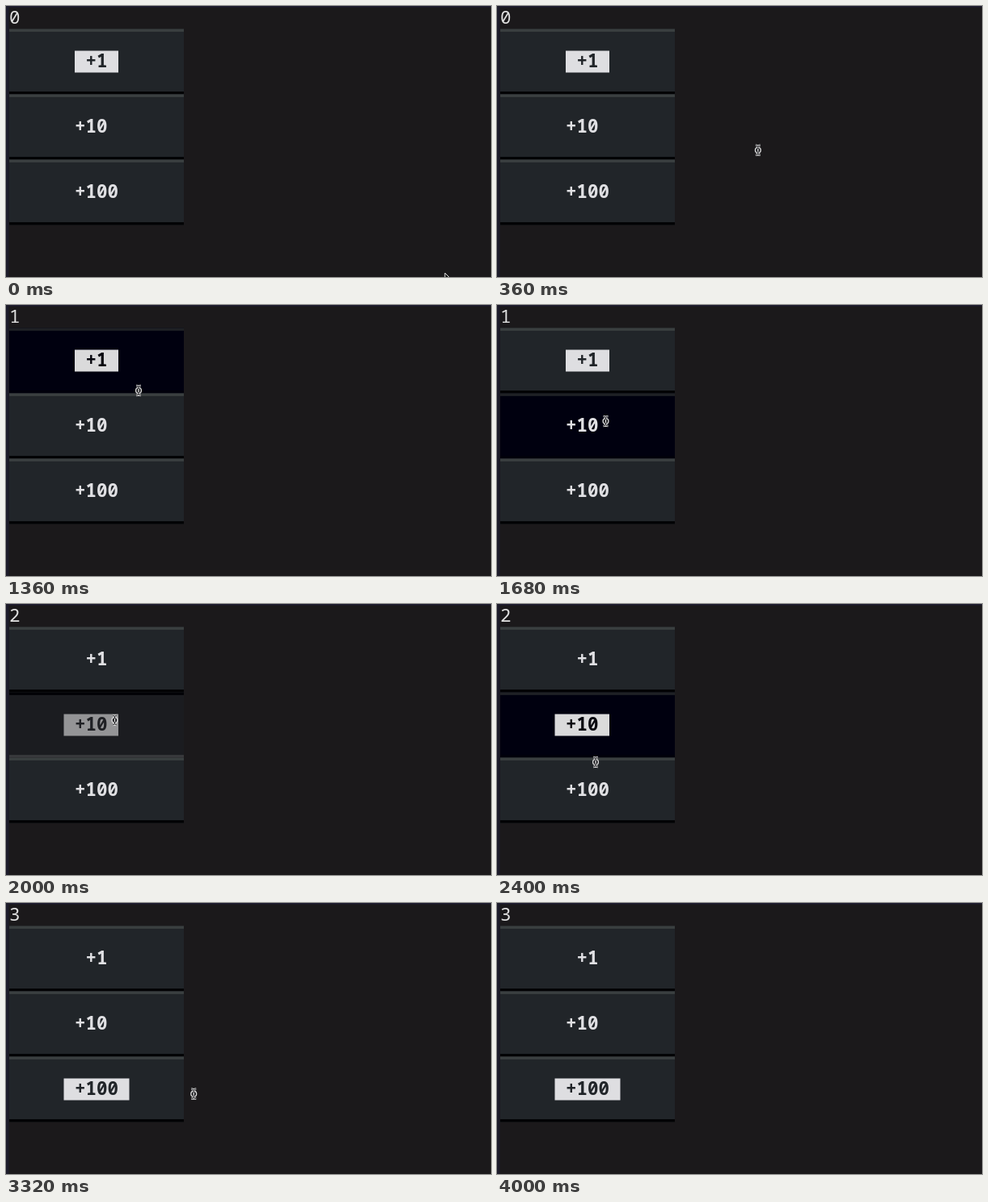
An HTML page for the animation above (4.32 s loop, 600x336 px).

```html
<!DOCTYPE html>
<html lang="en">
<head>
<meta charset="utf-8">
<title>Counter buttons</title>
<style>
html, body { margin: 0; width: 100%; height: 100%; overflow: hidden; background: #1b191b; }
svg { display: block; width: 600px; height: 336px; }
text { font: 22.5px "Noto Sans Mono", monospace; white-space: pre; }
.label { font-weight: 700; }
</style>
</head>
<body>
<svg id="stage" viewBox="0 0 600 336">
  <rect width="600" height="336" fill="#1b191b"/>
  <rect width="600" height="1.5" fill="#1f1d31"/>
  <rect width="3.5" height="336" fill="#1d1c2b"/>
  <text id="count" x="4" y="22" fill="#e0e0e0">0</text>
  <g id="buttons"></g>
  <g id="arrow">
    <path d="M0 0V15L3.6 11.6L6 17L8.4 16L6 10.6H10.5Z" fill="#111" stroke="#e8e8e8" stroke-width="1"/>
  </g>
  <g id="beam" fill="none">
    <path id="beamBack" d="M-3 -6Q0 -6 0 -4V4Q0 6 3 6M3 -6Q0 -6 0 -4M0 4Q0 6 -3 6" stroke="#d8d8d8" stroke-width="2.6"/>
    <circle r="3.4" fill="#16161a" stroke="#d8d8d8" stroke-width="1.4"/>
    <path d="M-3 -6Q0 -6 0 -4V4Q0 6 3 6M3 -6Q0 -6 0 -4M0 4Q0 6 -3 6" stroke="#16161a" stroke-width="0.9"/>
    <path d="M0 -2V2" stroke="#d8d8d8" stroke-width="1.4"/>
  </g>
</svg>
<script>
const NS = "http://www.w3.org/2000/svg";
const LOOP = 4320, STEP = 40, CELL = 13.5, ROW = 27, LEFT = 4, WIDTH = 216;
const byId = id => document.getElementById(id);

function add(parent, tag, attrs) {
  const node = document.createElementNS(NS, tag);
  set(node, attrs);
  parent.appendChild(node);
  return node;
}
function set(node, attrs) {
  for (const key in attrs) node.setAttribute(key, attrs[key]);
}

// fill, top edge, bottom edge, focused label box, focused label text
const looks = {
  idle:   ["#212529", "#3a3f40", "#020204", "#dedee1", "#212529"],
  hover:  ["#00000f", "#1f2125", "#00000b", "#dadadb", "#08080f"],
  active: ["#1b1c20", "#020206", "#38393c", "#949496", "#1f2024"]
};

const buttons = [["+1", 7], ["+10", 6], ["+100", 6]].map(([label, col], i) => {
  const y = 28.5 + i * ROW * 3, x = LEFT + col * CELL;
  const bar = (top, h) => add(byId("buttons"), "rect", { x: LEFT, y: top, width: WIDTH, height: h });
  const body = bar(y, ROW * 3), top = bar(y, 3.4), bottom = bar(y + ROW * 3 - 3.4, 3.4);
  const box = add(byId("buttons"), "rect",
    { x: x - CELL, y: y + ROW, width: (label.length + 2) * CELL, height: ROW });
  const text = add(byId("buttons"), "text", { x, y: y + ROW + 20.5, class: "label" });
  text.textContent = label;
  return { body, top, bottom, box, text };
});

function paint(button, look, focused) {
  const [fill, top, bottom, box, ink] = looks[look];
  set(button.body, { fill });
  set(button.top, { fill: top });
  set(button.bottom, { fill: bottom });
  set(button.box, { fill: focused ? box : "none" });
  set(button.text, { fill: focused ? ink : "#e0e0e3" });
}

// pointer keys: time, x, y
const path = [
  [40, 543, 331], [600, 180, 80], [1000, 180, 80], [1360, 164, 106],
  [1520, 138, 141], [1680, 134.5, 144], [2200, 134.5, 144], [2400, 122, 196],
  [2600, 114, 226], [3240, 114, 226], [3360, 380, 250]
];
function pointer(t) {
  if (t <= path[0][0]) return path[0].slice(1);
  const i = path.findIndex(k => k[0] > t);
  if (i < 0) return path[path.length - 1].slice(1);
  const [t0, x0, y0] = path[i - 1], [t1, x1, y1] = path[i];
  let p = (t - t0) / (t1 - t0);
  if (i === 1) p = p * p * (3 - 2 * p);
  if (i === path.length - 1) p *= p;
  return [x0 + (x1 - x0) * p, y0 + (y1 - y0) * p];
}

const presses = [[800, 1000], [2000, 2200], [2920, 3240]];

function render(time) {
  const t = Math.floor(time / STEP) * STEP;
  const [x, y] = pointer(t);
  const gone = t >= 3400, outside = t < 80;
  const count = presses.filter(p => t >= p[0]).length;
  const focus = Math.max(0, count - 1);
  let over = -1;
  if (!gone && x < LEFT + WIDTH && y < 271)
    over = t < 1400 ? 0 : t < 2440 ? 1 : 2;

  byId("count").textContent = count;
  buttons.forEach((button, i) => {
    const pressed = t >= presses[i][0] && t < presses[i][1];
    paint(button, pressed ? "active" : i === over ? "hover" : "idle", i === focus);
  });
  set(byId("arrow"), { transform: `translate(${x} ${y})`, visibility: outside ? "visible" : "hidden" });
  set(byId("beam"), { transform: `translate(${x} ${y})`, visibility: outside || gone ? "hidden" : "visible" });
}

const start = performance.now();
function tick() {
  render((performance.now() - start) % LOOP);
  requestAnimationFrame(tick);
}
render(0);
requestAnimationFrame(tick);
</script>
</body>
</html>
```
